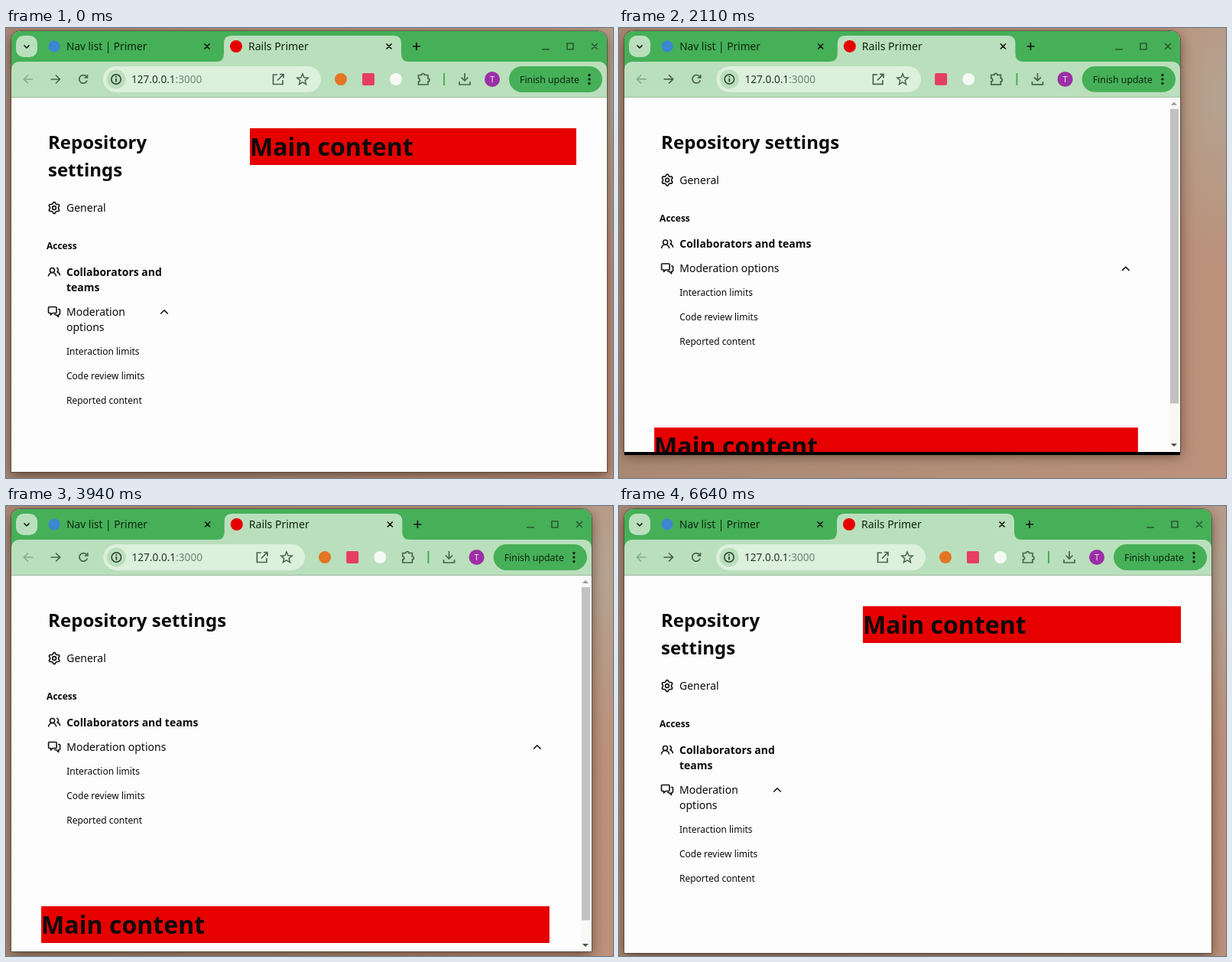
An HTML page for the animation above (7620 ms loop, 794 by 588 pixels).

```html
<!DOCTYPE html>
<html lang="en">
<head>
<meta charset="utf-8">
<title>Responsive sidebar</title>
<style>
html, body { margin: 0; width: 100%; height: 100%; overflow: hidden; }
body {
  position: relative;
  background:
    radial-gradient(ellipse 80px 220px at 785px 90px, #b4a391, transparent),
    linear-gradient(90deg, #a98873, #b59079 60%, #bb917a);
}
#window { position: absolute; left: 7px; top: 4px; overflow: hidden; border-radius: 12px 12px 0 0; background: #fdfdfd; }
svg { display: block; overflow: visible; transform-origin: 0 0; }
text { font-family: "Noto Sans", sans-serif; white-space: pre; }
.line { fill: none; stroke: #111; stroke-width: 1.6; stroke-linejoin: round; }
.tool { fill: none; stroke: #4b6350; stroke-width: 1.7; }
</style>
</head>
<body>
<div id="window">
<svg width="794" height="588" viewBox="7 4 794 588">
  <rect id="strip" x="7" y="4" height="60" fill="#45b058"/>
  <rect id="toolbar" x="7" y="44" height="60" rx="10" fill="#badfbc"/>
  <path d="M275 44Q285 44 285 34V20Q285 10 295 10H507Q517 10 517 20V34Q517 44 527 44Z" fill="#badfbc"/>
  <rect x="13" y="10" width="28" height="28" rx="10" fill="#badfbc"/>
  <path class="line" d="M23.5 22.5l3.5 3.5 3.5-3.5"/>
  <circle cx="63" cy="24" r="7.5" fill="#3c86d2"/>
  <circle cx="301" cy="24" r="8" fill="#e60000"/>
  <text x="79" y="29" font-size="13.7" fill="#10240f">Nav list | Primer</text>
  <text x="317" y="29" font-size="14" fill="#10240f">Rails Primer</text>
  <path class="line" d="M259.5 20.5l7 7m0-7l-7 7M497.5 20.5l7 7m0-7l-7 7M532 24h10m-5-5v10"/>
  <path class="tool" style="stroke:#83b18b" d="M35.5 67h-12m5.5-5.5l-5.5 5.5 5.5 5.5"/>
  <path class="tool" d="M58.5 67h12m-5.5-5.5l5.5 5.5-5.5 5.5M105.500 64a5.300 5.300 0 1 0 .6 4.500M106.500 61v4h-4"/>
  <rect id="address" x="127" y="50" height="34" rx="17" fill="#dcf0dc"/>
  <circle cx="144" cy="67" r="12.5" fill="#badfbc"/>
  <circle class="tool" cx="144" cy="67" r="6.2" style="stroke:#2c3d2c;stroke-width:1.5"/>
  <path class="tool" style="stroke:#2c3d2c" d="M144 63v1.7m0 1.300v4.500"/>
  <text x="164" y="72" font-size="13.6" fill="#25352a">127.0.0.1<tspan fill="#6f8676">:3000</tspan></text>
  <g id="addressIcons" class="tool">
    <path d="M-57 61h-5.5v12.5h12.5v-5.5M-54 60.5h5v5m0-5l-8 8"/>
    <path d="M-24 60l2 4.7 5.2.5-4 3.4 1.3 5.1-4.5-2.8-4.5 2.8 1.3-5.1-4-3.4 5.2-.5z" stroke-width="1.5"/>
  </g>
  <g id="rightTools">
    <circle id="extension" cx="-348" cy="67" r="8" fill="#e27625"/>
    <rect x="-320" y="59" width="16" height="16" rx="2" fill="#e63e60"/>
    <circle cx="-276" cy="67" r="8" fill="#f5faf5"/>
    <path class="tool" d="M-246.5 61.5h4a2 2 0 0 1 4 0h4.5v4.5a2 2 0 0 1 0 4v4h-12.5v-4a2 2 0 0 0 0-4z"/>
    <path stroke="#45b058" stroke-width="2" d="M-213 59v16"/>
    <path class="tool" d="M-186 59v10m-4.5-4.5l4.5 4.5 4.5-4.5M-193 70v4h14v-4"/>
    <circle cx="-150" cy="67" r="10" fill="#9c2fa8"/>
    <text x="-150" y="71" font-size="11" fill="#f3e3f0" text-anchor="middle">T</text>
    <rect x="-128" y="50" width="122" height="34" rx="17" fill="#45b058"/>
    <text x="-114" y="72" font-size="12.3" fill="#10240f">Finish update</text>
    <g fill="#10240f"><circle cx="-23" cy="61.5" r="1.7"/><circle cx="-23" cy="67" r="1.7"/><circle cx="-23" cy="72.5" r="1.7"/></g>
    <path class="line" style="stroke:#2c5a30;stroke-linejoin:miter" d="M-85 28h10M-52 20h8v8h-8zM-20 20l8 8m0-8l-8 8"/>
  </g>
  <rect id="page" x="7" y="91" height="600" fill="#fdfdfd"/>
  <path d="M7 90.5h900" stroke="#9dbc9f"/>
  <g id="wide"></g>
  <g id="narrow"></g>
  <g id="scrollbar">
    <rect x="-14" y="91" width="15" height="600" fill="#f8f8f6"/>
    <rect id="thumb" x="-13" y="106" width="11" fill="#c1c1c1"/>
    <path d="M-12 101l4-4 4 4z" fill="#9a9a9a"/>
    <path id="downArrow" d="M-12-2l4 4 4-4z" fill="#4c4c4c"/>
  </g>
</svg>
</div>
<script>
const $ = id => document.getElementById(id);
const set = (id, attrs) => {
  for (const name in attrs) $(id).setAttribute(name, attrs[name]);
};
const move = (id, x, y = 0) => set(id, { transform: `translate(${x} ${y})` });
const label = (x, y, size, text, weight = 400) =>
  `<text x="${x}" y="${y}" font-size="${size}" font-weight="${weight}" fill="#0b0b0b">${text}</text>`;
const icon = (y, shapes) => `<g class="line" transform="translate(63 ${y})">${shapes}</g>`;

const gearOutline = Array.from({ length: 24 }, (_, i) => {
  const angle = (i - 0.5) * Math.PI / 12 - Math.PI / 2;
  const radius = i % 4 < 2 ? 7.4 : 5.6;
  return [radius * Math.cos(angle), radius * Math.sin(angle)].map(v => v.toFixed(2));
}).join(" ");
const gear = `<polygon points="${gearOutline}"/><circle r="2.4"/>`;
const people = `<circle cx="-2.5" cy="-2.5" r="3"/>
  <path d="M-7.5 5.5a5 5 0 0 1 10 0M3-5.7a3 3 0 0 1 1 5.5a5 5 0 0 1 3.5 4.5"/>`;
const bubbles = `<path d="M-6.5-6.5h8.5q1 0 1 1v6q0 1-1 1h-4l-2.5 2.5v-2.5h-2q-1 0-1-1v-6q0-1 1-1z
  M5-3.5h1.5q1 0 1 1v5q0 1-1 1h-1v3l-3-3h-2.5"/>`;

// `rows` holds the centre line of each navigation entry.
function buildPage(id, rows, lines, banner) {
  const items = ["Interaction limits", "Code review limits", "Reported content"];
  const column = (texts, x, y, step, size, weight) =>
    texts.map((text, i) => label(x, y + i * step, size, text, weight)).join("");
  $(id).innerHTML =
    column(lines.title, 55, 158, 36, 24, 700) +
    icon(rows.general, gear) + label(79, rows.general + 5, 14, "General") +
    label(53, rows.access + 4, 12, "Access", 700) +
    icon(rows.people, people) + column(lines.people, 79, rows.people + 5, 20, 14, 700) +
    icon(rows.moderation, bubbles) + column(lines.moderation, 79, rows.moderation + 5, 20, 14, 400) +
    column(items, 79, rows.items + 4, 32, 12, 400) +
    `<path id="${id}Chevron" class="line" d="M-4.7 2.5l4.7-4.7 4.7 4.7"/>
     <rect id="${id}Banner" x="${banner.x}" y="${banner.y}" height="48" fill="#e60000"/>` +
    label(banner.x, banner.y + 36, 32, "Main content", 700);
}
const WIDE_BANNER = { x: 319, y: 131 }, NARROW_BANNER = { x: 46, y: 523 };
buildPage("wide",
  { general: 235, access: 285, people: 319, moderation: 371, items: 423 },
  { title: ["Repository", "settings"], people: ["Collaborators and", "teams"], moderation: ["Moderation", "options"] },
  WIDE_BANNER);
buildPage("narrow",
  { general: 199, access: 249, people: 283, moderation: 315, items: 347 },
  { title: ["Repository settings"], people: ["Collaborators and teams"], moderation: ["Moderation options"] },
  NARROW_BANNER);
move("wideChevron", 207, 371);

const LOOP = 7620, LEFT = 7, TOP = 4, BREAKPOINT = 768, CONTENT_HEIGHT = 520;

// Time, right edge and bottom edge of the dragged window.
const drag = [
  [0, 786, 580], [1140, 786, 580], [1630, 737, 550], [1730, 735, 549],
  [1880, 735, 549], [2180, 734, 556], [2450, 734, 556], [2560, 727, 566],
  [2640, 727, 577], [2700, 727, 580], [2880, 727, 580], [3200, 755, 588],
  [3290, 762, 588], [3550, 782, 588], [3810, 782, 588], [3900, 770, 582],
  [3940, 766, 582], [4140, 760, 582], [4310, 760, 582], [4680, 769, 584],
  [4880, 769, 584], [5080, 777, 584], [5630, 777, 584], [5660, 775, 584],
  [LOOP, 775, 584]
];
const ramp = (t, from, to) => Math.min(1, Math.max(0, (t - from) / (to - from)));

function draw(t) {
  const next = drag.findIndex(key => key[0] > t);
  const a = drag[next - 1], b = drag[next];
  const part = ramp(t, a[0], b[0]);
  const right = Math.round(a[1] + (b[1] - a[1]) * part);
  const bottom = Math.round(a[2] + (b[2] - a[2]) * part);
  const dirX = Math.sign(b[1] - a[1]), dirY = Math.sign(b[2] - a[2]);

  // The painted surface lags behind the frame: it stretches or leaves a black gap.
  const r = right - (dirX < 0 ? 2 : 0), h = bottom + dirY;
  const win = $("window");
  win.style.width = right - LEFT + "px";
  win.style.height = bottom - TOP + "px";
  win.style.boxShadow = `${dirX > 0 ? 4 : 0}px ${dirY > 0 && dirX <= 0 ? 4 : 0}px 0 #000,
    0 0 0 1px rgba(40,40,30,.45), 0 5px 16px rgba(40,20,10,.55)`;
  win.firstElementChild.style.transform =
    `scale(${(right - LEFT) / (r - LEFT)}, ${(bottom - TOP) / (h - TOP)})`;

  for (const id of ["strip", "toolbar", "page"]) set(id, { width: r - LEFT });
  move("rightTools", r);
  const shown = 1 - ramp(t, 1400, 1590) + ramp(t, 3130, 3335);
  const addressEnd = r - 338 - 36 * shown;
  set("address", { width: addressEnd - 127 });
  move("addressIcons", addressEnd);
  set("extension", { cx: -312 - 36 * shown, opacity: ramp(shown, 0, 0.6) });

  const isWide = right - LEFT >= BREAKPOINT;
  set("wide", { display: isWide ? "inline" : "none" });
  for (const id of ["narrow", "scrollbar"]) set(id, { display: isWide ? "none" : "inline" });
  set("wideBanner", { width: r - 40 - WIDE_BANNER.x });
  set("narrowBanner", { width: r - 55 - NARROW_BANNER.x });
  move("narrowChevron", r - 71, 315);
  move("scrollbar", r);
  const view = bottom - 91;
  set("thumb", { height: (view - 30) * Math.min(1, view / CONTENT_HEIGHT) });
  move("downArrow", 0, bottom - 8);
}

const start = performance.now();
function tick() {
  draw((performance.now() - start) % LOOP);
  requestAnimationFrame(tick);
}
tick();
</script>
</body>
</html>
```
